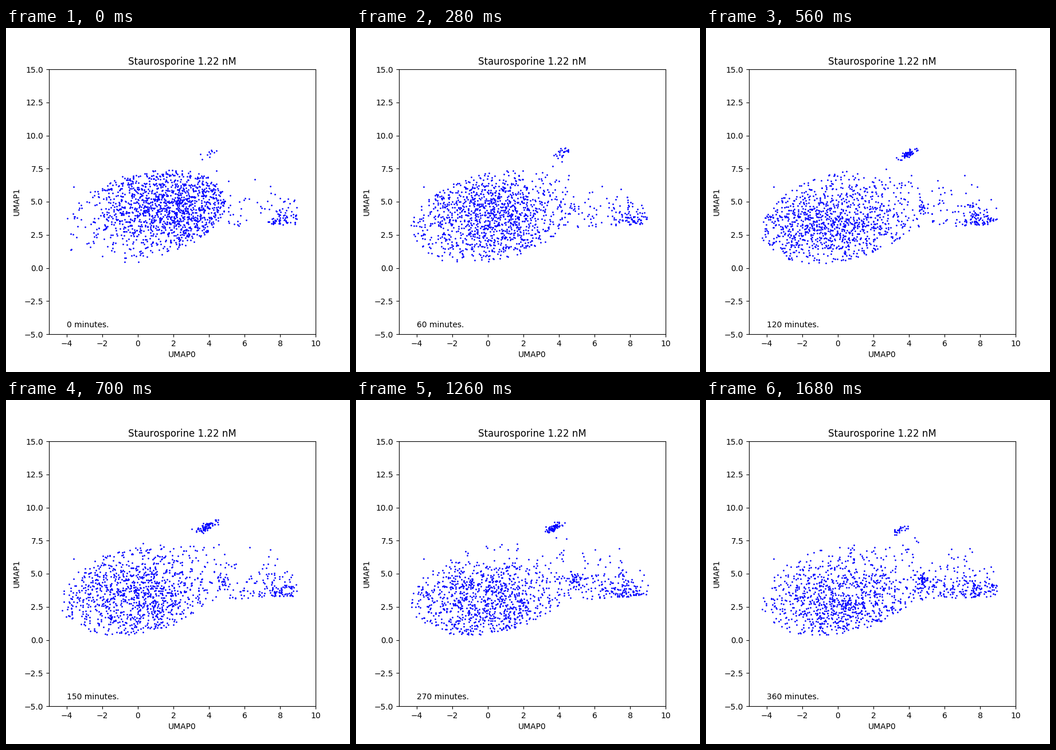
Animation of 600x600 px, one loop 1.82 s. Source, as a matplotlib script:

```python
import numpy as np
import matplotlib.pyplot as plt
from matplotlib.animation import FuncAnimation

plt.rcParams["text.kerning_factor"] = 6  # whole-pixel kerning

FRAMES, INTERVAL, STEP_MIN = 13, 140, 30
FIXED = np.array([(-3.6, 6.12), (8.95, 3.7)])  # cells seen at every time


def cloud(rng, step):
    """Main population: a skewed ellipse, densest around a drifting focus."""
    n = int(950 + 450 * np.exp(-step / 4))
    r, angle = np.sqrt(rng.random(8 * n)), rng.uniform(0, 2 * np.pi, 8 * n)
    u, v = r * np.cos(angle), r * np.sin(angle)
    x = 0.3 + 4.65 * u
    y = 3.9 + 3.55 * (0.3 * u + 0.954 * v)
    focus_x = 3.3 * np.exp(-step / 2) - 1.3 + 0.13 * step
    focus_y = 2.6 + 2 * np.exp(-step / 4)
    weight = np.exp(-((x - focus_x) / 2.5) ** 2 / 2 - ((y - focus_y) / 2) ** 2 / 2)
    keep = rng.random(8 * n) < weight
    return np.column_stack((x, y))[keep][:n]


def island(rng, step):
    """Small slanted group at the top that swells and shrinks."""
    n = int(10 + 75 * np.sin(np.pi * step / 14) ** 2)
    x = np.clip(rng.normal(4.15 - 0.05 * step, 0.28, n), 3.2, 4.5)
    y = 8.55 + 0.6 * (x - 3.85) + rng.normal(0, 0.14, n)
    return np.column_stack((x, np.minimum(y, 9.05)))


def above_floor(rng, x, spread):
    """Scatter points upwards from the lower edge of the right arm."""
    y = 2.7 + 0.07 * x + np.abs(rng.normal(0, spread, x.size))
    return np.column_stack((x, y))[(x < 9) & (y < 7.3)]


def blob(rng, n, centre, spread):
    return rng.normal(centre, spread, (n, 2))


def cells(step):
    rng = np.random.default_rng(100 + step)
    return np.vstack([
        cloud(rng, step),
        island(rng, step),
        above_floor(rng, rng.normal(8.1, 0.5, 75), 0.85),
        above_floor(rng, rng.uniform(4.5, 8, 35 + 10 * step), 1.5),
        blob(rng, 3 * step, (4.8, 4.6), (0.17, 0.24)),
        blob(rng, 10, (4, 6.5), (0.5, 0.8)),
        FIXED,
    ])


fig, ax = plt.subplots(figsize=(6, 6), dpi=100)
ax.set(xlim=(-5, 10), ylim=(-5, 15), xlabel="UMAP0", ylabel="UMAP1",
       title="Staurosporine 1.22 nM")
dots, = ax.plot([], [], "o", color="blue", markersize=1)
clock = ax.text(-4, -4.5, "")


def update(step):
    dots.set_data(*cells(step).T)
    clock.set_text(f"{step * STEP_MIN} minutes.")
    return dots, clock


anim = FuncAnimation(fig, update, frames=FRAMES, interval=INTERVAL,
                     repeat=True, repeat_delay=0)
plt.show()
```
